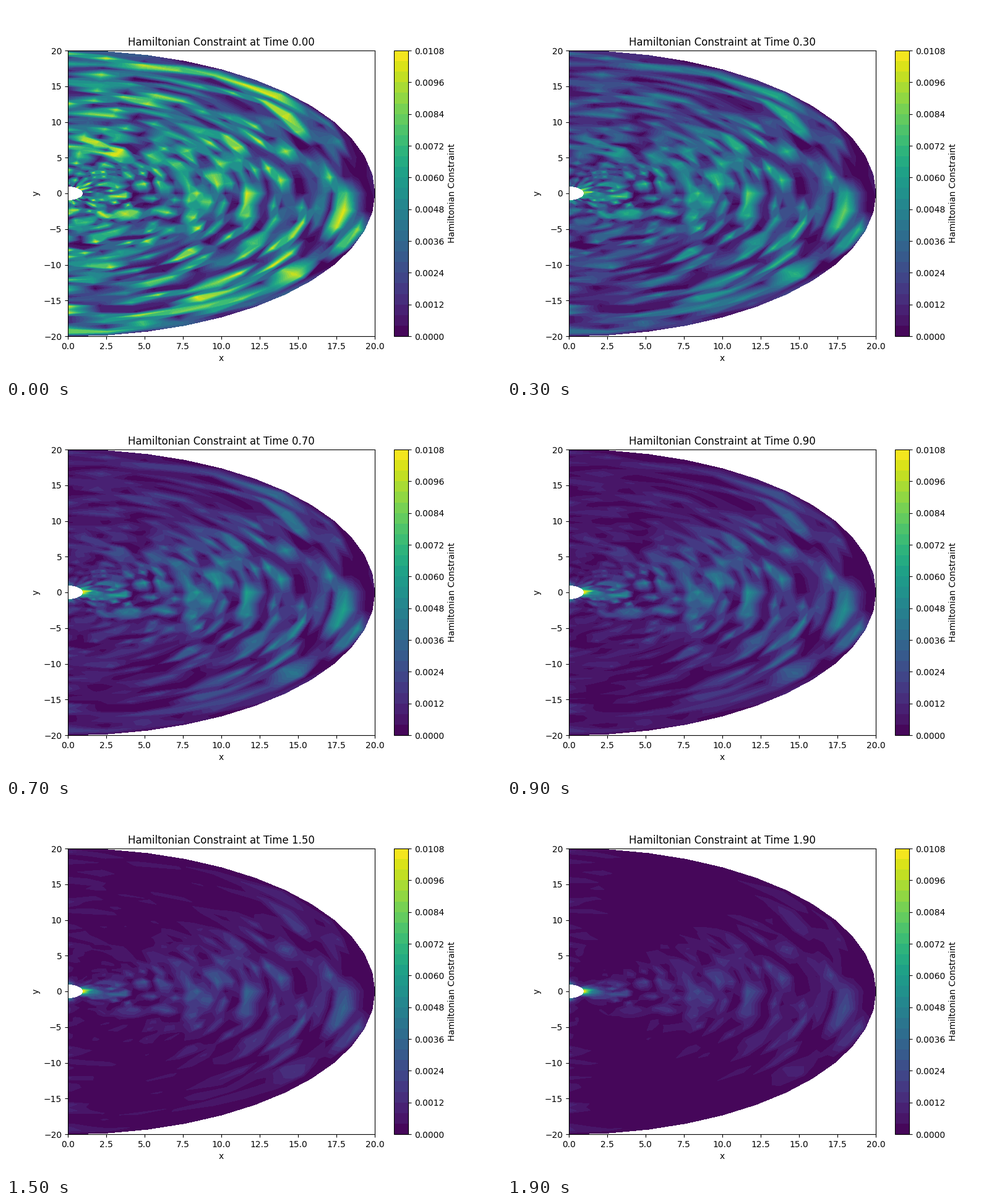
A matplotlib script for the animation above (2000 ms loop, 800x600 px).

```python
import numpy as np
import matplotlib.pyplot as plt
from matplotlib.animation import FuncAnimation

FRAMES, INTERVAL = 20, 100
NR, NT = 42, 25
PEAK = 0.0104
LEVELS = np.arange(28) * 0.0004

r = np.linspace(1, 20, NR)[:, None]
lat = np.linspace(-np.pi / 2, np.pi / 2, NT)[None, :]
X, Y = r * np.cos(lat), r * np.sin(lat)
polar = 1 - np.cos(lat)

# A few landmarks in the noise, as (x, y)
BRIGHT = [(11.1, 6.3), (16.9, 2.7), (8.9, -1.6), (12.4, -6.9), (17.5, -4.5),
          (11.7, -14.3), (14, 1.8), (13.5, 13.9), (18.3, -1)]
DARK = [(19.2, 3), (2.5, -13.8), (15.4, -0.2)]


def bump(x, y, width):
    """Bell around (x, y), stretched along the circle through it."""
    dist = (r - np.hypot(x, y)) / width
    turn = (lat - np.arctan2(y, x)) / 0.1
    return np.exp(-dist**2 - turn**2)


def initial_field():
    rng = np.random.default_rng(7)
    field = PEAK * rng.random((NR, NT))**1.6
    for x, y in BRIGHT:
        field += (PEAK - field) * bump(x, y, 0.4)
    for x, y in DARK:
        field *= 1 - 0.9 * bump(x, y, 1.4)
    field[-1] *= 0.4
    return field


# Noise fades fastest at the poles while a glow settles on the inner edge
start = initial_field()
rate = 0.72 + 2.42 * polar
floor = 0.1 * polar**4
glow = PEAK * (np.cos(lat)**10 * np.exp(-1.7 * (r - 1))
               + 0.45 * polar**2 * np.exp(-3 * (r - 1)))


def constraint(t):
    noise = start * (floor + (1 - floor) * np.exp(-rate * t))
    settled = 1 - np.exp(-4 * t)
    return np.clip(noise + glow * settled, 1e-6, 0.0107)


def contours(t):
    return ax.contourf(X, Y, constraint(t), levels=LEVELS, cmap="viridis")


fig, ax = plt.subplots(figsize=(8, 6), dpi=100)
shown = [contours(0)]
fig.colorbar(shown[0], ax=ax, label="Hamiltonian Constraint")
ax.set(xlim=(0, 20), ylim=(-20, 20), xlabel="x", ylabel="y")
title = ax.set_title("")


def update(frame):
    t = frame * INTERVAL / 1000
    shown.pop().remove()
    shown.append(contours(t))
    title.set_text(f"Hamiltonian Constraint at Time {t:.2f}")
    return [shown[0], title]


anim = FuncAnimation(fig, update, frames=FRAMES, interval=INTERVAL,
                     init_func=lambda: update(0), repeat=True, repeat_delay=0)
plt.show()
```
